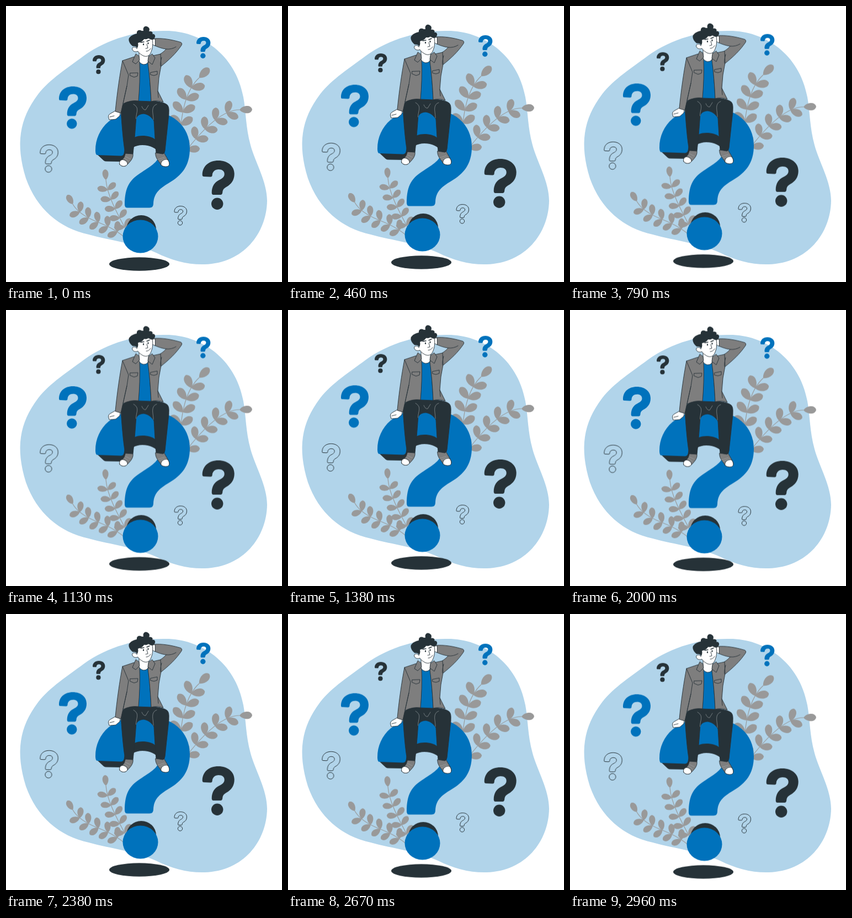
An HTML page for the animation above (3 s loop, 500 px wide and 500 px high).

```html
<!DOCTYPE html>
<html lang="en">
<head>
<meta charset="utf-8">
<title>Floating question</title>
<style>
  html, body { margin: 0; width: 100%; height: 100%; overflow: hidden; background: #fff; }
  svg { display: block; width: 100%; height: 100%; }
  #float { animation: float 3s linear infinite; }
  @keyframes float { 50% { transform: translateY(-10px); } }
  #mark * { vector-effect: non-scaling-stroke; }
  .blob { fill: #b1d4ea; }
  .blue { fill: #0072bc; }
  .dark { fill: #263238; }
  .line { fill: none; stroke: #263238; stroke-width: 1; }
  .leaf { fill: #999; }
  .stem { fill: none; stroke: #999; stroke-width: 1.2; }
  .man { stroke: #263238; stroke-width: .9; stroke-linejoin: round; stroke-linecap: round; }
  .skin { fill: #fff; }
  .coat { fill: #7e7e7e; }
  .thin { fill: none; }
  .seam { fill: none; stroke: #aab0b3; stroke-width: .6; }
  .bare { stroke: none; }
</style>
</head>
<body>
<svg viewBox="0 0 500 500">
  <defs>
    <g id="mark">
      <path d="M3 29Q0 29 0 26C0 10 12 0 29 0C46 0 58 10 58 24C58 36 52 43 44 47.5C38 51 37 53 36.5 58Q36 62 33 62H20Q17 62 17 58C17 46 23 39 30 35.5C37 32 40 29 40 24.5C40 19 36 16 29.5 16C23 16 18.5 20 18 26Q18 30 14 29.5Z"/>
      <circle cx="27" cy="78.3" r="10.7"/>
    </g>
  </defs>

  <path class="blob" d="M285 45C348 43 415 84 430 165C435 192 434 220 443 252C451 282 473 318 473 353C472 412 430 466 360 468C330 469 300 461 272 447C235 430 190 425 150 414C96 402 56 368 36 312C17 250 24 205 58 160C80 132 112 112 140 91C185 58 240 45 285 45Z"/>

  <g id="float">
    <g id="plants"></g>

    <use href="#mark" class="blue" transform="translate(96 145.700) scale(.862)"/>
    <use href="#mark" class="blue" transform="translate(345 56) scale(.437)"/>
    <use href="#mark" class="dark" transform="translate(157 89) scale(.385)"/>
    <use href="#mark" class="dark" transform="translate(355.700 280)"/>
    <g class="line">
      <use href="#mark" transform="translate(61.800 251.400) scale(.56)"/>
      <use href="#mark" transform="translate(305 362.500) scale(.388)"/>
    </g>

    <!-- big question mark -->
    <ellipse class="dark" cx="241.5" cy="467.5" rx="54.5" ry="12.2"/>
    <ellipse class="dark" cx="245" cy="405" rx="27" ry="26"/>
    <ellipse class="blue" cx="243.5" cy="417.5" rx="32" ry="30"/>
    <path class="dark" d="M163 267L177 280Q179 281.500 182 281.500L210 282L219 268Z"/>
    <path class="dark" d="M212 268C216 247 228 234 247 234C267 234 281 244 281 264L278 268C272 257 261 252 247 252C234 252 224 258 218 270Z"/>
    <path class="blue" d="M165 270Q162 269 162 262C162 220 196 189 248 189C301 188 333 217 333 258C333 290 318 307 296 320C276 332 268 340 267 358Q267 365.500 260 365.500H220Q215 365.500 215 360C215 327 225 314 246 301C266 288 279 280 279 262C279 244 267 235 247 235C228 235 216 247 214 265Q213 272 208 271.500Z"/>

    <g class="man">
      <!-- seated legs and shoes -->
      <path class="coat" d="M217 266L230 268C231 275 226 281 220 287C216 292 209 291 206 287C205 282 211 279 214 274Z"/>
      <path class="skin" d="M206 287C204 281 209 277 214 279C219 281 220 284 220 287C216 292 209 291 206 287Z"/>
      <path class="coat" d="M271 266L286 265C289 272 295 279 296 285C296 291 286 293 281 288C277 281 272 277 271 270Z"/>
      <path class="skin" d="M281 288C279 282 286 277 292 278C296 281 297 288 294 290C290 292 284 291 281 288Z"/>
      <path class="seam" d="M215 276L222 281M217 273L225 277M275 278L287 274M277 281L290 276"/>
      <path class="dark" d="M215 176C222 171 240 170 250 172C265 171 285 173 292 179C296 183 295 190 295 196L288 262Q287 268 284 268L272 266C270 245 269 222 268 208C262 199 256 196 249 195C240 196 236 200 235.500 206C234 230 232 250 230 268L216 267C212 245 210 215 208 188C208 182 211 178 215 176Z"/>
      <path class="seam" d="M235.500 204C236 194 239 190 237 184Q235 180 231 178M267 206C267 196 264 190 267 183Q269 179 273 178M246 182Q249 189 253 188L258 180"/>

      <!-- hands, neck, shirt -->
      <path class="skin" d="M198 190L189 195Q185 197 185.500 201L187 206Q193 206 199 205L206 199L207 194Z"/>
      <path class="thin" d="M188 201L196 199"/>
      <path class="blue" d="M241 101H258C260 125 262 150 263 173L239 172C241 150 242 125 241 101Z"/>
      <path class="skin" d="M241 82V101Q249 110 257 103L259 88Z"/>

      <!-- jacket -->
      <path class="coat" d="M268 59C282 58 297 60 316 65.500Q320 67 318 71C308 86 295 98 280 110L271 92C280 87 286 83 290 78C282 77 274 74 268 71Z"/>
      <path class="coat" d="M232 92L211 99C206 125 201 160 198 191L208 194L219 145L212 177Q226 170 240 172C242 150 243 125 242 101Z"/>
      <path class="coat" d="M257 103L266 90L280 87L281 108L277 130L275 154L285 174Q273 170 263 173C262 150 260 125 257 103Z"/>
      <path class="thin" d="M211 99L222 125L219 145M282 93Q279 103 280 109M290 78Q300 79 308 74M275 154L276 166"/>
      <path class="coat" d="M235 87L229 101L235 105L242 98L241 91Z"/>
      <path class="coat" d="M258 92L257 100L265 106L270 94L265 87Z"/>
      <path class="coat" d="M225 121.500L239 121L238 127L232 129L225 126Z"/>
      <path class="coat" d="M262 120.500L274 118L274 124L268 126L262 124.500Z"/>

      <!-- head -->
      <path class="skin" d="M270 60C266 59 263 61 262 64C263 68 266 71 270 72Z"/>
      <path class="skin" d="M237 66L250 56L265 60C267 70 265 80 261 87C257 93 250 92 245 88C242 86 240 84 239 82C233 85 227 80 229 76C232 73 236 75 237 77Z"/>
      <path class="dark bare" d="M238 76C236 73 232 72 230 73C223 68 220.500 60 224 57C227 53 232 51 237 50C236 45 241 42 246 45L249 45C247 38 253 35 257 38C261 40 260 44 259 46C264 45 267 48 265 51C270 50 271.500 55 269 58C267 62 262 62 258 58C256 61 252 60 250 60C247 65 242 66 239 67C240 71 239 74 238 76Z"/>
      <path class="thin" d="M255 69L257 76L253 77M254 82Q259 82 262 77"/>
      <path class="thin" stroke-width="1.4" d="M244 66L250 65M255 64L260 62"/>
      <ellipse class="dark bare" cx="249" cy="69.500" rx="1.1" ry="1.8"/>
      <ellipse class="dark bare" cx="257.500" cy="67.500" rx="1.1" ry="1.8"/>
    </g>
  </g>
</svg>
<script>
  const LEAF = 'M0 0C.25 -.34 .9 -.42 1 0C.9 .42 .25 .34 0 0Z';
  const plants = document.getElementById('plants');

  function addPath(attrs) {
    const path = document.createElementNS('http://www.w3.org/2000/svg', 'path');
    for (const key in attrs) path.setAttribute(key, attrs[key]);
    return plants.appendChild(path);
  }

  // The stem runs from tip to root; leaf pairs sit at even gaps below the end leaf.
  function plant(d, pairs, gap, size, spread) {
    const stem = addPath({ class: 'stem', d });
    for (let i = 0; i <= pairs; i++) {
      const base = stem.getPointAtLength(i * gap);
      const below = stem.getPointAtLength(i * gap + 2);
      const along = Math.atan2(base.y - below.y, base.x - below.x) * 180 / Math.PI;
      for (const turn of i ? [-spread, spread] : [0]) {
        addPath({
          class: 'leaf', d: LEAF,
          transform: `translate(${base.x} ${base.y}) rotate(${along + turn}) scale(${size})`
        });
      }
    }
  }

  plant('M350 130C326 152 316 195 316 240', 4, 23.5, 25, 52);
  plant('M423 188C390 188 352 228 322 268', 5, 24.5, 23, 48);
  plant('M181 315C183 345 205 382 228 425', 5, 18.5, 19, 64);
  plant('M121 359C130 375 150 385 165 391S200 405 222 425', 5, 19.3, 19.5, 58);
</script>
</body>
</html>
```
